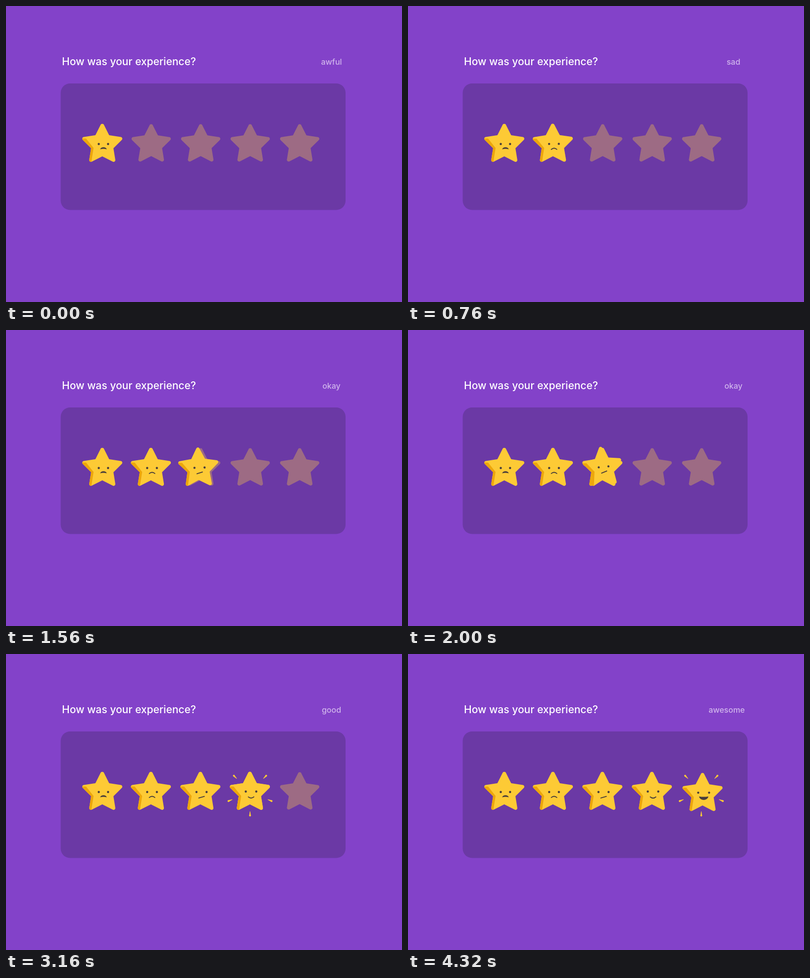
An HTML page with a canvas for the animation above (5.32 s loop, 800 by 600 pixels).

```html
<!DOCTYPE html>
<html lang="en">
<head>
<meta charset="utf-8">
<title>Star rating</title>
<style>
  html, body { margin: 0; width: 100%; height: 100%; overflow: hidden; background: #8342c9; }
  canvas { display: block; width: 800px; height: 600px; }
</style>
</head>
<body>
<canvas id="stage" width="800" height="600"></canvas>
<script>
const ctx = document.getElementById('stage').getContext('2d');
const LOOP = 5320;
const YELLOW = '#fdca35', SHADE = '#eda60b', EMPTY = '#9d6b84', INK = '#473d3b';
const FONT = 'Inter, "Open Sans", sans-serif';
const LABELS = ['awful', 'sad', 'okay', 'good', 'awesome'];
const STARTS = [240, 1080, 1840, 3160];
const SWAP = 320, MOVE = 540;
const CY = 280;
const centerX = i => i ? 192.7 + 100 * i : 194.5;

const ramp = (t, from, to) => Math.min(1, Math.max(0, (t - from) / (to - from)));
const smooth = p => 0.5 - 0.5 * Math.cos(Math.PI * p);
const hump = p => Math.sin(Math.PI * p);
const overshoot = p => 1 + 3.4 * (p - 1) ** 3 + 2.4 * (p - 1) ** 2;

// Regular star with softened tips, its middle just below the origin.
function makeStar() {
  const point = k => {
    const angle = (k / 5 - 0.5) * Math.PI, r = k % 2 ? 23.2 : 45.8;
    return [r * Math.cos(angle), 1 + r * Math.sin(angle)];
  };
  const path = new Path2D();
  const [x0, y0] = point(0), [x9, y9] = point(9);
  path.moveTo((x0 + x9) / 2, (y0 + y9) / 2);
  for (let k = 0; k < 10; k++) path.arcTo(...point(k), ...point(k + 1), k % 2 ? 1 : 3.5);
  path.closePath();
  return path;
}
const STAR = makeStar();

function polygon(pts) {
  ctx.beginPath();
  pts.forEach(([x, y]) => ctx.lineTo(x, y));
  ctx.fill();
}

function dot(x, y, r) {
  ctx.beginPath();
  ctx.arc(x, y, r, 0, 2 * Math.PI);
  ctx.fill();
}

// Mood runs from -2 (awful) to 2 (awesome); both extremes open the mouth.
function drawFace(mood) {
  const eyeGap = 10.2 + 0.4 * mood;
  ctx.fillStyle = ctx.strokeStyle = INK;
  for (const side of [-1, 1]) dot(2.3 + side * eyeGap, mood > 0 ? -1.2 : -0.3, 2.2);

  const open = Math.abs(mood) === 2;
  const half = open ? 8 + 0.7 * mood : 5.6;
  const y = open ? 8.4 - mood : 10.3 - 0.6 * mood;
  const slant = mood ? 0 : 1.6;
  const left = 2.4 - half, right = 2.4 + half;
  ctx.lineWidth = 1.9;
  ctx.lineCap = 'round';
  ctx.beginPath();
  ctx.moveTo(left, y + slant);
  if (open) {
    const bend = y + 3.75 * mood + 1.9;
    ctx.bezierCurveTo(left + 1.6, bend, right - 1.6, bend, right, y);
    ctx.quadraticCurveTo(2.4, y + 0.9 * mood, left, y);
    ctx.fill();
  } else {
    ctx.quadraticCurveTo(2.4, y + 4.8 * mood, right, y - slant);
    ctx.stroke();
  }
}

function drawStar(x, y, face, tilt = 0, width = 1) {
  ctx.save();
  ctx.translate(x, y);
  ctx.rotate(tilt * Math.PI / 180);
  ctx.scale(width, 1);
  ctx.save();
  ctx.scale(1.02, 1.02);
  ctx.fillStyle = YELLOW;
  ctx.fill(STAR);
  ctx.clip(STAR);
  ctx.fillStyle = SHADE;
  polygon([[-44, -11.5], [-32, -11], [-17.3, 7.5], [-22, 38], [-32, 38]]);
  ctx.restore();
  drawFace(face - 2);
  ctx.restore();
}

function drawEmpty(i) {
  ctx.save();
  ctx.translate(193.3 + 100 * i, CY);
  ctx.fillStyle = EMPTY;
  ctx.fill(STAR);
  ctx.restore();
}

// Five drops spring out around a star.
function drawSparks(x, grow, size) {
  if (size <= 0) return;
  const reach = 16 + 32 * grow;
  ctx.fillStyle = YELLOW;
  for (let k = -2; k <= 2; k++) {
    ctx.save();
    ctx.translate(x, CY + 0.5);
    ctx.rotate((90 + 68 * k) * Math.PI / 180);
    ctx.translate(reach, 0);
    ctx.scale(size, size);
    dot(-0.9, 0, 1.8);
    polygon([[-0.6, -1.8], [-9.5, -0.4], [-9.5, 0.4], [-0.6, 1.8]]);
    ctx.restore();
  }
}

function drawText(label) {
  ctx.fillStyle = '#fff';
  ctx.font = `500 21px ${FONT}`;
  ctx.textAlign = 'left';
  ctx.fillText('How was your experience?', 113, 119.5);
  ctx.fillStyle = '#d0b5ec';
  ctx.font = `500 16px ${FONT}`;
  ctx.textAlign = 'center';
  // Centred, but kept inside the right margin
  ctx.fillText(label, Math.min(657.5, 680.5 - ctx.measureText(label).width / 2), 119);
}

// The star leans back, narrows and slides over to the next place.
function drawMover(i, u) {
  const from = centerX(i), to = centerX(i + 1);
  const x = from + (to - from) * smooth(ramp(u, 150, 530));
  const lean = hump((u / MOVE) ** 0.75);
  const width = 1 - 0.16 * hump(ramp(u, 140, 430));
  drawStar(x, CY - 2.2 * lean, u < SWAP ? i : i + 1, -6.2 * lean, width);
}

function draw(t) {
  ctx.fillStyle = '#8342c9';
  ctx.fillRect(0, 0, 800, 600);
  ctx.fillStyle = '#6b39a5';
  ctx.beginPath();
  ctx.roundRect(110.5, 157, 575.5, 256.5, 19);
  ctx.fill();

  const settled = STARTS.filter(s => t >= s + MOVE).length;
  drawText(LABELS[STARTS.filter(s => t >= s + SWAP).length]);
  for (let i = settled + 1; i < 5; i++) drawEmpty(i);

  const shrink = 1 - smooth(ramp(t, 3160, 3330));
  drawSparks(493, overshoot(ramp(t, 2290, 2910)) * shrink, ramp(t, 2290, 2420) * shrink);
  drawSparks(592.5, overshoot(ramp(t, 3860, 4320)), ramp(t, 3860, 4000));

  const sink = smooth(ramp(t, 3880, 4320));
  for (let i = 0; i <= settled; i++) {
    const drop = i === 4 ? 2.3 * sink : 0;
    drawStar(centerX(i) + drop, CY + drop, i);
  }
  if (settled < 4 && t >= STARTS[settled]) drawMover(settled, t - STARTS[settled]);
}

const begin = performance.now();
function tick() {
  draw((performance.now() - begin) % LOOP);
  requestAnimationFrame(tick);
}
tick();
</script>
</body>
</html>
```
